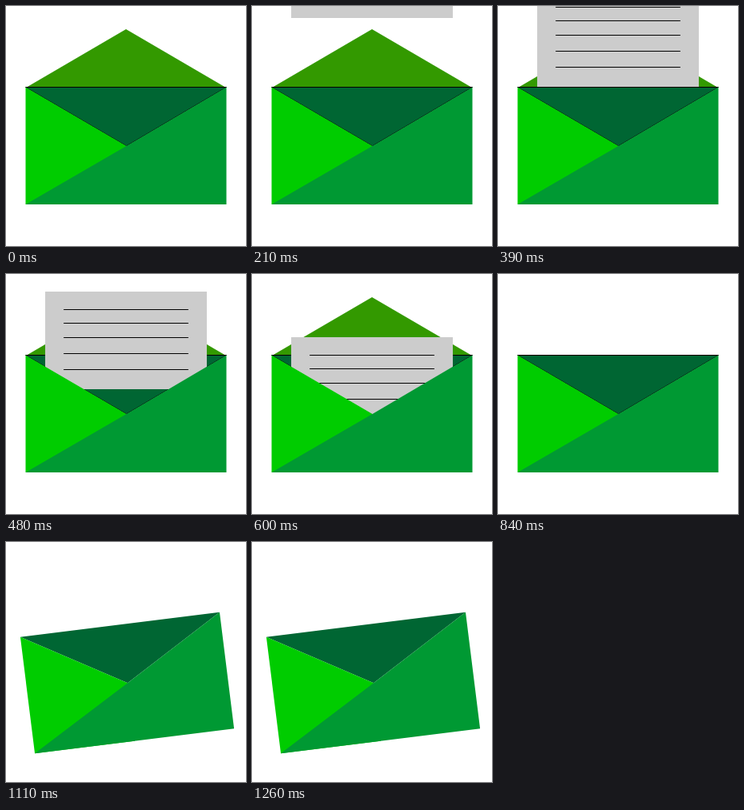
Animation of 300x300 px, one loop 1.35 s. Source, as an HTML page:

```html
<!DOCTYPE html>
<html lang="en">
<head>
<meta charset="utf-8">
<title>Envelope</title>
<style>
  html, body { margin: 0; width: 100%; height: 100%; overflow: hidden; background: #fff; }
  svg { display: block; width: 100%; height: 100%; }
</style>
</head>
<body>
<svg viewBox="0 0 300 300">
  <g id="envelope">
    <polygon id="flap" points="25,102 150,29 275,102" fill="#390"/>
    <polygon id="inside" points="24.5,101.5 275.5,101.5 150.5,175" fill="#063" stroke-linejoin="bevel"/>
    <g id="letter">
      <rect x="49" width="202" height="122" fill="#ccc"/>
      <path d="M72 22.5H228M72 39.5H228M72 57.5H228M72 77.5H228M72 97.5H228" stroke="#000"/>
    </g>
    <polygon points="24.5,101.5 150.5,175 150.5,248 24.5,248" fill="#0c0"/>
    <polygon points="275.5,101.5 275.5,248 24.5,248 150.5,175" fill="#093"/>
  </g>
</svg>
<script>
const LOOP = 1350, STEP = 30;
const DROP_START = 180, DROP_END = 660, LETTER_GONE = 720, CLOSED = 840, SHAKE = 1050;
const [envelope, flap, inside, letter] =
  ['envelope', 'flap', 'inside', 'letter'].map(id => document.getElementById(id));

const show = (node, visible) => node.setAttribute('visibility', visible ? 'inherit' : 'hidden');

function draw(now) {
  const t = Math.floor((now % LOOP) / STEP) * STEP;

  // The letter falls at a constant speed, then rests inside.
  const fall = (Math.min(t, DROP_END) - DROP_START) / STEP * 14.3;
  letter.setAttribute('transform', `translate(0 ${Math.round(fall - 121.2)})`);
  show(letter, t >= DROP_START && t < LETTER_GONE);
  show(flap, t < CLOSED);

  // Each 90 ms beat opens with a blank step; poses alternate tilted and straight.
  const shaking = t >= SHAKE;
  const beat = Math.floor((t - SHAKE) / 90);
  const blank = shaking && t < 1320 && (t - SHAKE) % 90 === 0;
  const tilted = shaking && beat % 2 === 0 || t >= 1260;
  show(envelope, !blank);
  envelope.setAttribute('transform',
    tilted ? 'translate(151.5 176) rotate(-7.1) translate(-150 -174.75)' : '');
  inside.setAttribute('stroke', tilted ? 'none' : '#000');
}

function tick() {
  draw(performance.now());
  requestAnimationFrame(tick);
}
tick();
</script>
</body>
</html>
```
